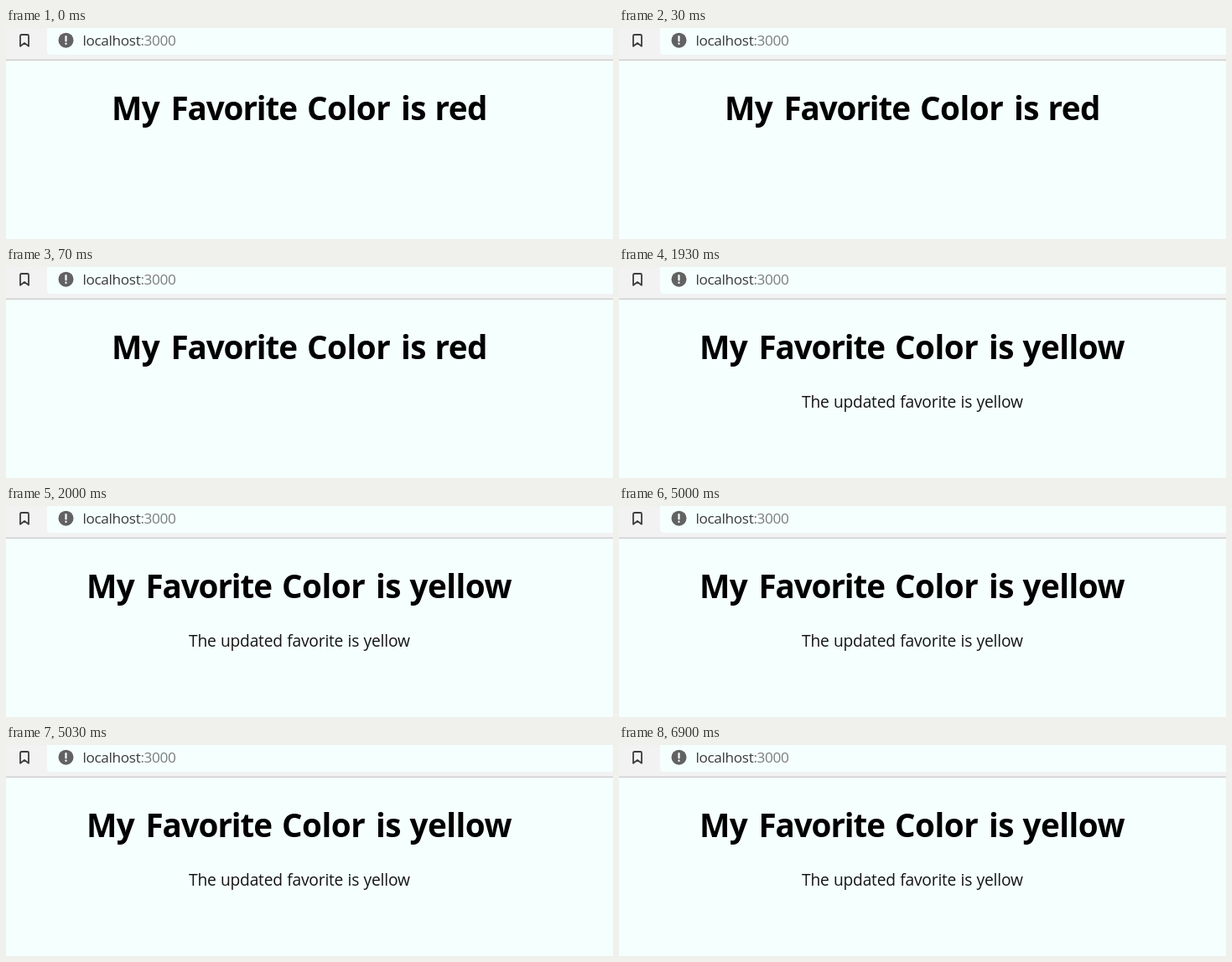
Write an HTML page that moves like this. It is 724x252 px and loops after 6.93 s.

```html
<!DOCTYPE html>
<html lang="en">
<head>
<meta charset="utf-8">
<title>Favorite color</title>
<style>
  html, body { margin: 0; width: 100%; height: 100%; overflow: hidden; background: #f5fffe; }
  svg { display: block; width: 724px; height: 252px; }
  text { font-family: "Open Sans", "Noto Sans", sans-serif; }
  .title { font-size: 38.6px; font-weight: 700; letter-spacing: -.5px; }
  .long { letter-spacing: -1.1px; }
  .note { font-size: 19.2px; letter-spacing: -.2px; word-spacing: .6px; fill: #141414; }
  .url { font-size: 17.2px; letter-spacing: -.35px; fill: #3a3a3a; }
  .port { fill: #7c7c7c; }

  /* The color changes at 1930 ms of 6930 ms. */
  .before, .after, .heading { animation: 6930ms step-end infinite; }
  .before { animation-name: leave; }
  .after { animation-name: enter; }
  .heading { animation-name: recenter; }
  @keyframes leave { 0% { opacity: 1; } 27.85%, 100% { opacity: 0; } }
  @keyframes enter { 0% { opacity: 0; } 27.85%, 100% { opacity: 1; } }
  @keyframes recenter {
    0% { transform: translateX(0); }
    27.85%, 100% { transform: translateX(-30px); }
  }
</style>
</head>
<body>
<svg viewBox="0 0 724 252">
  <rect width="724" height="252" fill="#f5fffe"/>

  <!-- Address bar -->
  <rect width="724" height="38" fill="#f2f2f2"/>
  <path d="M49 0H724V32H54Q49 32 49 27Z" fill="#f5fffe"/>
  <rect y="37.5" width="724" height="1.5" fill="#cfcfcf"/>
  <path d="M17 9.5Q17 8 18.5 8H25.5Q27 8 27 9.5V21.7L22 18L17 21.7Z" fill="none" stroke="#3c3c3c" stroke-width="1.8" stroke-linejoin="round"/>
  <circle cx="71.5" cy="14.7" r="9" fill="#626262"/>
  <path d="M71.5 10V15.5M71.5 18.6V19" stroke="#f5fffe" stroke-width="2.2" stroke-linecap="round"/>
  <text class="url" x="91.5" y="21">localhost<tspan class="port">:3000</tspan></text>

  <!-- Page -->
  <g class="heading">
    <text class="title" y="109.5">
      <tspan x="126">My</tspan>
      <tspan class="long" x="196.5">Favorite</tspan>
      <tspan x="359">Color</tspan>
      <tspan x="471">is</tspan>
    </text>
    <text class="title before" x="511.5" y="109.5">red</text>
    <text class="title after" x="511.5" y="109.5">yellow</text>
  </g>
  <text class="note after" x="218" y="168">The updated favorite is yellow</text>
</svg>
</body>
</html>
```
